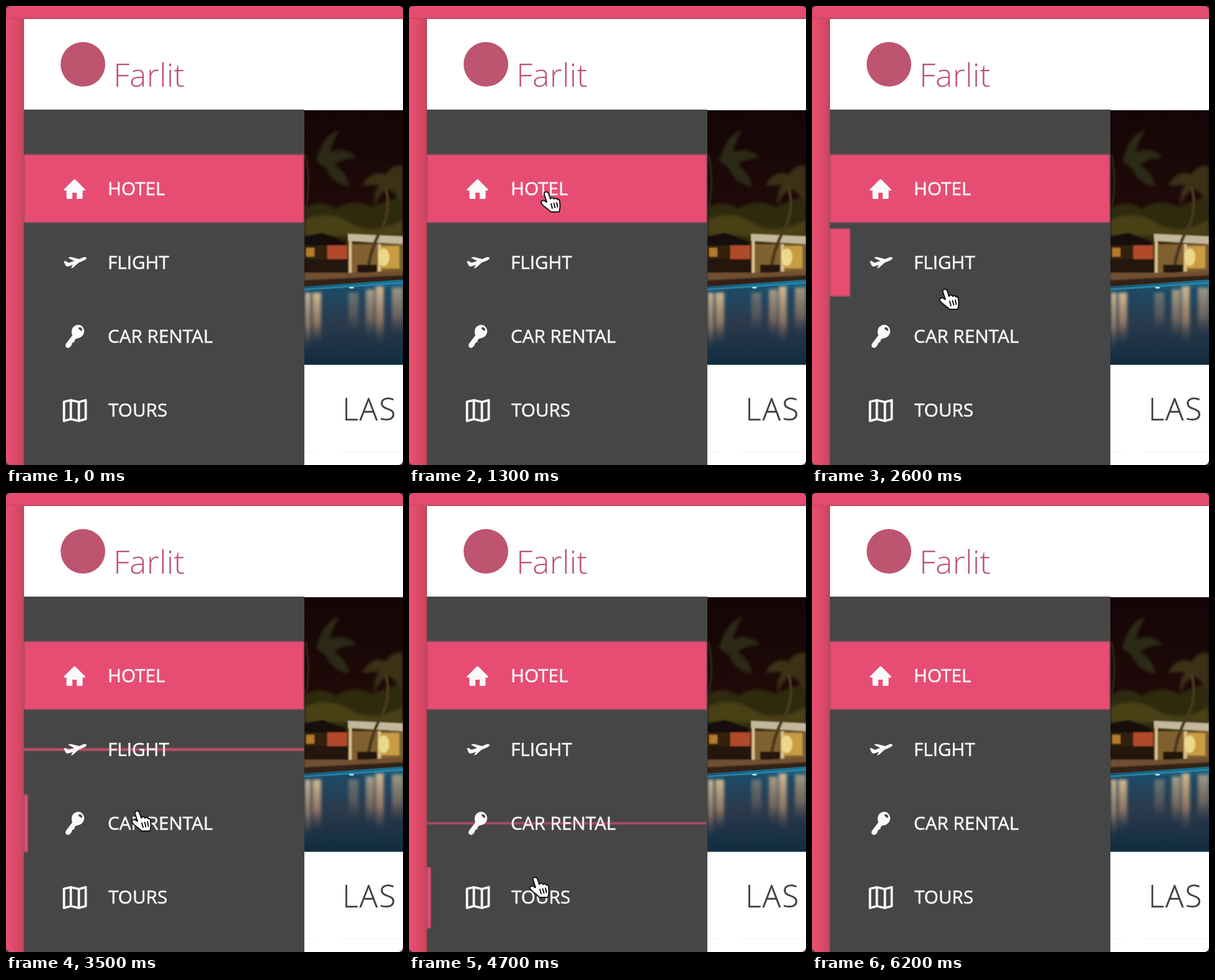
Recreate the animation shown at these times as an HTML page. Size 640 by 740 pixels, loop 6300 ms.

```html
<!DOCTYPE html>
<html lang="en">
<head>
<meta charset="utf-8">
<title>Travel menu</title>
<style>
  html, body { margin: 0; width: 100%; height: 100%; overflow: hidden; background: #3a3337; }
  svg { display: block; width: 640px; height: 740px; }
  text { font-family: "Open Sans", sans-serif; }
  .label { font-size: 29.7px; fill: #f8f4f5; stroke: #f8f4f5; stroke-width: .6px; }
  .light { font-weight: 300; }
  .icon { fill: #fbf9fa; }
  .bar, .active { fill: #e74e73; }
</style>
</head>
<body>
<svg viewBox="0 0 640 740">
  <defs>
    <clipPath id="stage"><rect width="640" height="740" rx="8"/></clipPath>
    <clipPath id="photo"><rect x="481" y="168" width="159" height="410.5"/></clipPath>
    <linearGradient id="side">
      <stop offset="0" stop-color="#e8506f"/>
      <stop offset=".4" stop-color="#e04c6b"/>
      <stop offset=".85" stop-color="#d04762"/>
      <stop offset="1" stop-color="#b4455c"/>
    </linearGradient>
    <linearGradient id="top" x2="0" y2="1">
      <stop offset="0" stop-color="#e74d71"/>
      <stop offset=".8" stop-color="#e34b6e"/>
      <stop offset="1" stop-color="#cb4867"/>
    </linearGradient>
    <linearGradient id="sky" x2="0" y2="1">
      <stop offset="0" stop-color="#150507"/>
      <stop offset=".5" stop-color="#1e0a09"/>
      <stop offset="1" stop-color="#2a1d10"/>
    </linearGradient>
    <linearGradient id="pool" x2="0" y2="1">
      <stop offset="0" stop-color="#1a7698"/>
      <stop offset=".12" stop-color="#1d4a66"/>
      <stop offset=".5" stop-color="#2b3a4c"/>
      <stop offset="1" stop-color="#102c3f"/>
    </linearGradient>
    <linearGradient id="glow" x2="0" y2="1">
      <stop offset="0" stop-color="#e8c596" stop-opacity=".9"/>
      <stop offset=".6" stop-color="#b58d6b" stop-opacity=".7"/>
      <stop offset="1" stop-color="#6a5a54" stop-opacity="0"/>
    </linearGradient>
    <filter id="soft" x="-30%" y="-30%" width="160%" height="160%"><feGaussianBlur stdDeviation="2.5"/></filter>
    <filter id="fine"><feGaussianBlur stdDeviation=".8"/></filter>
  </defs>

  <g clip-path="url(#stage)">
    <rect width="640" height="740" fill="#e64d70"/>
    <rect y="20" width="29" height="720" fill="url(#side)"/>
    <rect width="640" height="21" fill="url(#top)"/>
    <rect x="29" y="21" width="611" height="719" fill="#fff"/>

    <circle cx="124" cy="94" r="36" fill="#bd5570"/>
    <text class="light" x="173" y="129.5" font-size="52" fill="#bd5570">Farlit</text>

    <g clip-path="url(#photo)">
      <rect x="481" y="168" width="159" height="285" fill="url(#sky)"/>
      <g filter="url(#soft)">
        <path d="M481 326 Q505 310 532 327 Q560 308 590 324 L640 305 V392 H481Z" fill="#2f2a0f"/>
        <path d="M481 345 Q520 328 555 350 T640 345 V370 H481Z" fill="#4a4018"/>
        <path d="M500 250 Q512 205 538 200 Q526 218 522 236 Q550 226 565 245 Q540 246 530 256 Q552 272 553 292 Q524 285 516 262Z" fill="#2c2a12"/>
        <path d="M574 290 Q590 262 612 272 Q622 255 640 258 V322 Q626 296 614 296 Q602 302 594 322 Q592 300 602 288Z" fill="#3b3319"/>
      </g>
      <g filter="url(#fine)">
        <path d="M483 240 Q492 285 483 325" fill="none" stroke="#33271a" stroke-width="3"/>
        <rect x="481" y="382" width="159" height="58" fill="#32200f"/>
        <path d="M481 372 L510 366 L547 380 V386 H481Z" fill="#19110a"/>
        <rect x="518" y="386" width="32" height="22" fill="#b04a2a"/>
        <rect x="484" y="390" width="13" height="14" fill="#b47a2e"/>
        <rect x="558" y="384" width="82" height="46" fill="#80602f"/>
        <path d="M551 367 L640 371 V384 L551 379Z" fill="#c4b79c"/>
        <path d="M555 379 V433 M602 384 V428" stroke="#dcc28f" stroke-width="5"/>
        <rect x="604" y="387" width="30" height="36" fill="#c89c43"/>
        <ellipse cx="609" cy="405" rx="9" ry="14" fill="#ecd88c"/>
        <path d="M612 292 Q622 330 604 362 T582 438" fill="none" stroke="#49381f" stroke-width="5"/>
        <path d="M481 408 H552 V432 H481Z M566 417 H598 V432 H566Z" fill="#21140c"/>
        <path d="M481 430 H578 L640 426 V443 L481 452Z" fill="#715030"/>
        <path d="M481 442 L640 434 V444 L481 454Z" fill="#302319"/>
      </g>
      <path d="M481 452 L640 441 V579 H481Z" fill="url(#pool)"/>
      <g filter="url(#soft)" fill="url(#glow)">
        <rect x="482" y="462" width="9" height="92"/>
        <rect x="494" y="462" width="14" height="82"/>
        <rect x="552" y="462" width="16" height="64" opacity=".4"/>
        <rect x="580" y="457" width="14" height="78" opacity=".75"/>
        <rect x="596" y="452" width="13" height="92"/>
        <rect x="622" y="454" width="18" height="74" opacity=".7"/>
      </g>
      <path d="M481 457 L640 446" stroke="#2991b5" stroke-width="3" opacity=".75"/>
      <ellipse cx="557" cy="454" rx="4" ry="1.5" fill="#a9e4ec"/>
    </g>

    <text class="light" x="542.5" y="668" font-size="49" letter-spacing="2.2" fill="#3d3d40" stroke="#3d3d40" stroke-width=".4">LAS</text>
    <path d="M481 718.5 H503 M537 718.5 H640" stroke="#f3f3f3"/>

    <rect x="29" y="167" width="452" height="573" fill="#464646"/>
    <path d="M28.5 20.5 H640 M28.5 20 V740" fill="none" stroke="#a44b62" stroke-opacity=".6"/>
    <rect class="active" x="29" y="239.5" width="451" height="109.5" filter="url(#fine)"/>
    <g id="bars" filter="url(#fine)"></g>

    <g class="icon">
      <path d="M109 280 Q110.500 278.500 112 280 L127.500 295.500 Q128.500 297.500 126.500 297.500 H123.500 V309 Q123.500 311 121.500 311 H114 V301 H107 V311 H99.500 Q97.500 311 97.500 309 V297.500 H94.500 Q92.500 297.500 93.500 295.500Z"/>
      <path d="M93 412 L96 411 L101 414 L110 411 L100 406 L104 404.500 L118 408 L125 405 Q130 404 130 406.500 Q129 409 124 411 L117 414 L108 422 L104.500 423 L108 417.500 L100 420 Q97 420.500 96 418Z"/>
      <path fill-rule="evenodd" d="M108 518 Q114 512 121 515 Q127 520 126 526 Q124 535 114 536 L111 538 L110 542 L107 543 L105 548 L101 551.500 L96.500 550 Q95 547 97 544 L107 531 Q104 524 108 518Z M116.500 519.500 Q118 522.500 122 524 Q124 522 121.500 519 Q118.500 517 116.500 519.500Z"/>
      <path d="M93.500 638 L104.500 635.500 L117.500 638.500 L128.500 635.500 V666 L117.500 669 L104.500 666 L93.500 669Z M104.500 635.500 V666 M117.500 638.500 V669" fill="none" stroke="#fbf9fa" stroke-width="3.8" stroke-linejoin="round"/>
    </g>
    <g class="label">
      <text x="164" y="305">HOTEL</text>
      <text x="164" y="424">FLIGHT</text>
      <text x="164" y="543">CAR RENTAL</text>
      <text x="165" y="662">TOURS</text>
    </g>

    <g id="hand" stroke="#151515" stroke-linejoin="round" stroke-linecap="round">
      <path d="M-4 4 C-5 -1 1 -2 3 2 L6 11 C8 8 11 9 12 11 C14 9 17 10 17 12 C20 11 21 13 21 16 C22 22 22 26 20 32 L6 32 C3 27 -5 24 -9 18 C-10 13 -4 12 -1 16 L0 16Z" fill="#fff" stroke-width="2"/>
      <path d="M7 19 L9 26 M11.500 18 L13.500 25 M16 17 L17.500 24" fill="none" stroke-width="2"/>
    </g>
  </g>
</svg>
<script>
const LOOP = 6300, STEP = 100;
const LEFT = 29, FULL = 451, THIN = 6, HEIGHT = 109;

// hover start and end per menu row
const rows = [
  { y: 359, enter: 2270, leave: 3345 },
  { y: 478, enter: 3390, leave: 4538 },
  { y: 598, enter: 4575, leave: 5700 }
];

// pointer path: time, x, y
const path = [
  [700, -40, 326], [1300, 222, 300], [1900, 222, 302], [2270, 219, 359],
  [2600, 215, 457], [3345, 214, 468], [3500, 212, 513], [4000, 208, 560],
  [4538, 204, 587], [4700, 204, 620], [5200, 215, 652], [5700, 250, 708],
  [5950, 262, 775]
];

const hand = document.getElementById("hand");
const bars = document.getElementById("bars");
for (const row of rows) {
  row.bar = document.createElementNS("http://www.w3.org/2000/svg", "rect");
  row.bar.setAttribute("class", "bar");
  row.bar.setAttribute("x", LEFT);
  bars.append(row.bar);
}

const clamp = v => Math.min(1, Math.max(0, v));

function bezier(x1, y1, x2, y2) {
  const at = (a, b, s) => 3 * (1 - s) * (1 - s) * s * a + 3 * (1 - s) * s * s * b + s * s * s;
  return v => {
    const x = clamp(v);
    if (x === 0 || x === 1) return x;
    let lo = 0, hi = 1;
    for (let i = 0; i < 30; i++) {
      const mid = (lo + hi) / 2;
      if (at(x1, x2, mid) < x) lo = mid; else hi = mid;
    }
    return at(y1, y2, lo);
  };
}

const ease = bezier(0.25, 0.1, 0.25, 1);
const snap = bezier(1, 0, 0, 1);

function drawBar({ y, enter, leave, bar }, t) {
  const scale = t < leave ? ease((t - enter) / 200) : 1 - ease((t - leave) / 200);
  const width = THIN + (FULL - THIN) * snap((t - enter - 200) / 400);
  const h = HEIGHT * scale;
  bar.setAttribute("y", y + (HEIGHT - h) / 2);
  bar.setAttribute("height", h);
  bar.setAttribute("width", width);
}

function drawHand(t) {
  const next = path.findIndex(p => p[0] > t);
  hand.style.display = next < 1 ? "none" : "";
  if (next < 1) return;
  const [t0, x0, y0] = path[next - 1], [t1, x1, y1] = path[next];
  const k = (t - t0) / (t1 - t0);
  hand.setAttribute("transform", `translate(${x0 + (x1 - x0) * k} ${y0 + (y1 - y0) * k})`);
}

function draw(t) {
  for (const row of rows) drawBar(row, t);
  drawHand(t);
}

const start = performance.now();
function tick() {
  const t = (performance.now() - start) % LOOP;
  draw(Math.floor(t / STEP) * STEP);
  requestAnimationFrame(tick);
}
tick();
</script>
</body>
</html>
```
